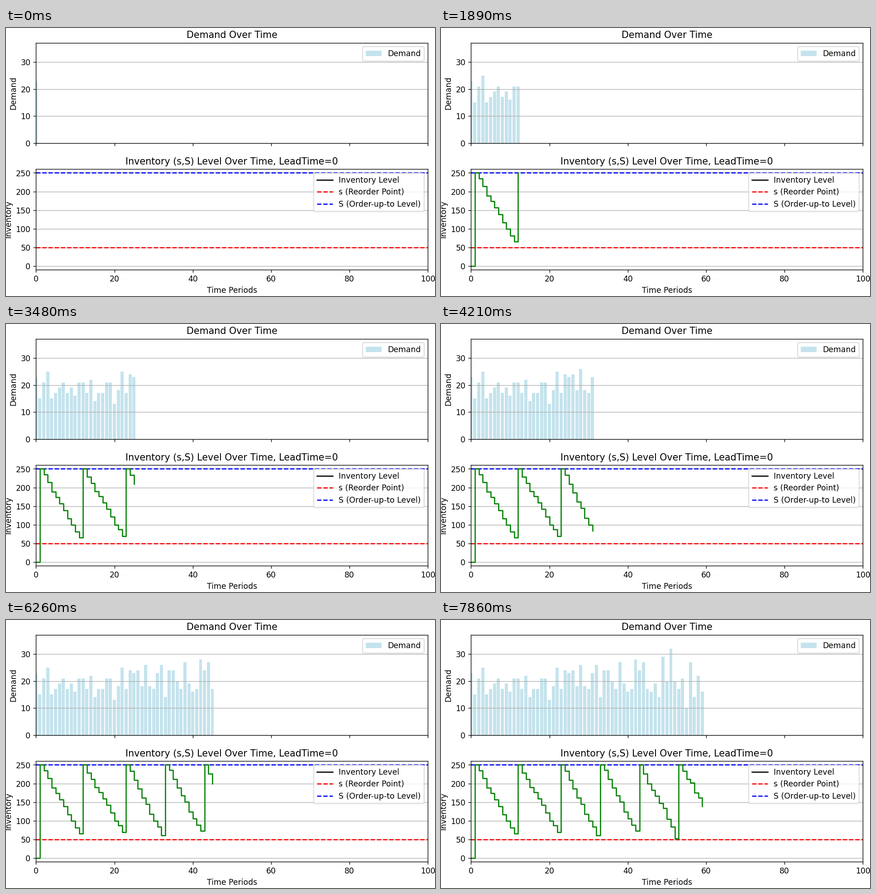
Animation of 948 by 591 pixels, one loop 8000 ms. Source, as a matplotlib script:

```python
import matplotlib.pyplot as plt
import numpy as np
from matplotlib.animation import FuncAnimation

W, H, DPI = 948, 591, 124
LEFT, RIGHT = 66.3, 932.3
LOOP, STEP = 8000, 40
LOW, HIGH = 50, 250
PERIODS, LAST = 100, 59

# the periods run evenly between these moments (ms)
TIMES = [130, 270, 1210, 4210, 5210, 6260, 7860]
REACHED = [0, 1, 7, 31, 36, 45, LAST]

demand = np.random.RandomState(42).poisson(20, PERIODS)[:LAST + 1]


def stock_levels():
    """(s,S) policy without lead time: refill to HIGH when below LOW."""
    stock = [0]
    for d in demand[:-1]:
        left = stock[-1] - d
        stock.append(left if left >= LOW else HIGH)
    return stock


def add_panel(top, bottom, title, ylabel, ylim):
    ax = fig.add_axes([LEFT / W, 1 - bottom / H,
                       (RIGHT - LEFT) / W, (bottom - top) / H])
    ax.set(xlim=(0, PERIODS), ylim=ylim, title=title, ylabel=ylabel)
    ax.grid(axis="y")
    return ax


plt.rcParams["font.family"] = "DejaVu Sans"
fig = plt.figure(figsize=((W + 0.01) / DPI, (H + 0.01) / DPI), dpi=DPI)

ax1 = add_panel(32.6, 254.4, "Demand Over Time", "Demand", (0, 37))
ax1.tick_params(labelbottom=False)
bars = ax1.bar(range(LAST + 1), demand, width=0.8, color="lightblue",
               alpha=0.7, label="Demand")
ax1.legend(loc="upper right")

ax2 = add_panel(311.3, 532.75, "Inventory (s,S) Level Over Time, LeadTime=0",
                "Inventory", (-10, 260))
ax2.set_xlabel("Time Periods")
ax2.set_yticks(range(0, HIGH + 1, 50))
ax2.plot([], [], color="black", label="Inventory Level")
ax2.axhline(LOW, color="red", ls="--", label="s (Reorder Point)")
ax2.axhline(HIGH, color="blue", ls="--", label="S (Order-up-to Level)")
ax2.legend(loc="upper right")

stock = stock_levels()
level, = ax2.step([], [], where="post", color="green")


def draw(i):
    now = int(np.interp((i + 0.5) * STEP, TIMES, REACHED) + 1e-6)
    for n, bar in enumerate(bars):
        bar.set_visible(n <= now)
    level.set_data(range(now + 1), stock[:now + 1])
    return [*bars, level]


anim = FuncAnimation(fig, draw, frames=LOOP // STEP, interval=STEP,
                     init_func=lambda: draw(0), repeat=True, repeat_delay=0)
plt.show()
```
